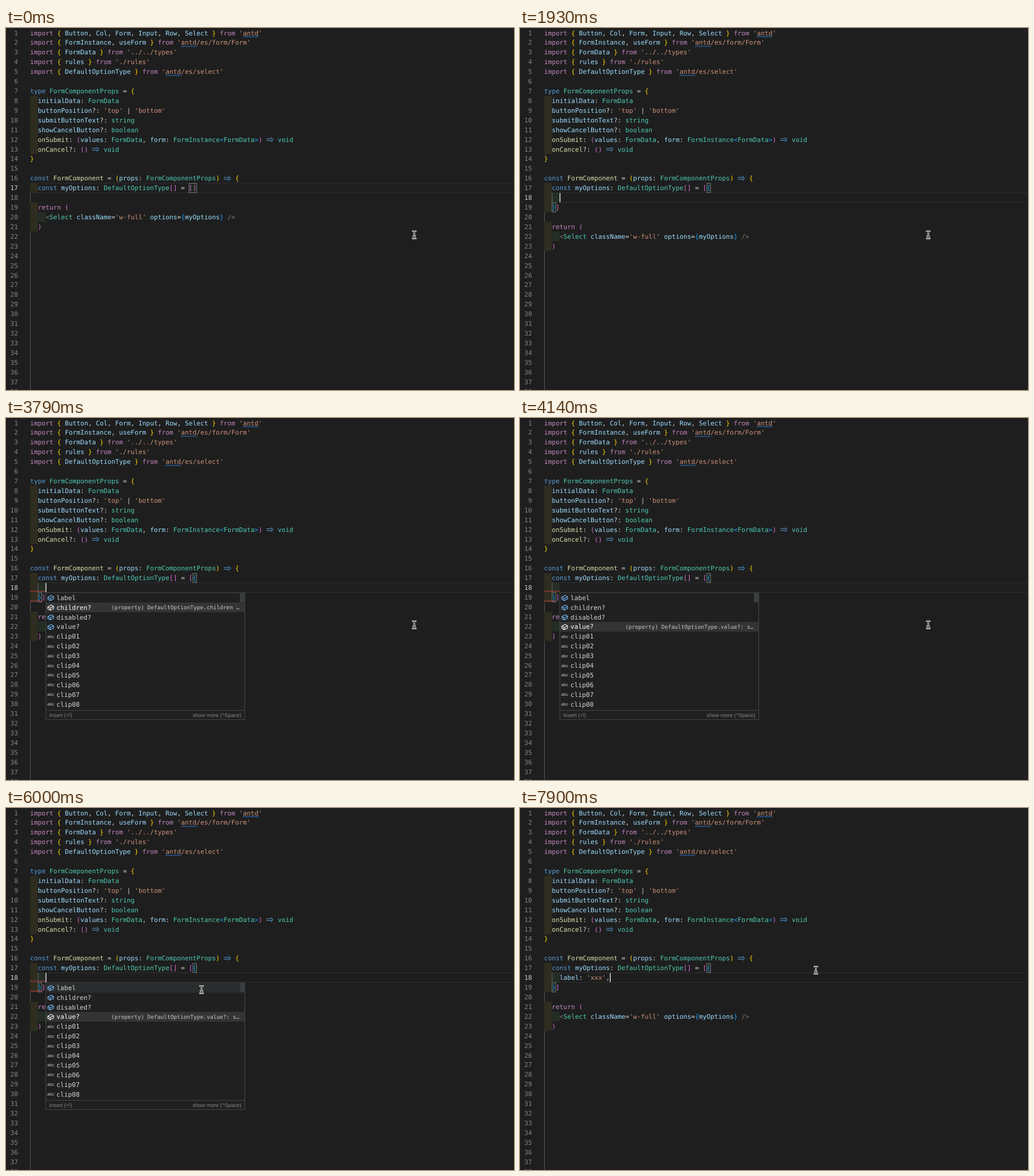
Write an HTML page that moves like this. It is 886 px wide and 632 px high and loops after 8 s.

```html
<!DOCTYPE html>
<html lang="en">
<head>
<meta charset="utf-8">
<title>Code editor</title>
<style>
  html, body { margin: 0; width: 100%; height: 100%; overflow: hidden; background: #1e1e1e; }
  svg { display: block; }
  text { white-space: pre; text-rendering: geometricPrecision; }
  .code { font: 11.212px "DejaVu Sans Mono", "Liberation Mono", monospace; }
  .detail { font: 9.54px "DejaVu Sans Mono", "Liberation Mono", monospace; fill: #c8c8c8; }
  .abc { font: 7.4px "Liberation Sans", sans-serif; fill: #cccccc; }
  .foot { font: 9.3px "Liberation Sans", "DejaVu Sans", sans-serif; fill: #858585; }
  .line { fill: none; stroke-linecap: round; stroke-linejoin: round; }
</style>
</head>
<body>
<svg width="886" height="632" viewBox="0 0 886 632">
  <defs>
    <path id="cube" class="line" stroke-width="1.1" d="M-5-1.2 1-4.3 5-1.8V2L-1 4.8-5 2.3ZM-5-1.2-1 1.2 5-1.8M-1 1.2V4.8"/>
    <path id="stem" class="line" d="M-2.7-6.2Q0-6.2 0-4.2Q0-6.2 2.7-6.2M0-4.5V4.8M-2.7 6.4Q0 6.4 0 4.4Q0 6.4 2.7 6.4M-1.6 2.4H1.6"/>
    <g id="beam">
      <use href="#stem" stroke="#fff" stroke-width="2.6"/>
      <use href="#stem" stroke="#111" stroke-width=".9"/>
    </g>
    <path id="hand" d="M-3.6-5Q-2.7-6.3-1.6-5L-.2-1.6Q1-2.5 1.8-1.4Q3-2 3.6-.8Q5-1 5.1.6L4.6 3.4 3.6 6H-1.4L-4.7 1.7Q-5 .2-3.5.4L-2.2 1.4Z" fill="#fff" stroke="#111" stroke-width=".9" stroke-linejoin="round"/>
  </defs>
  <g id="view"></g>
</svg>
<script>
const LOOP = 8000, X = 42, CW = 6.75, LH = 16.92;
const COLORS = {
  p: '#c586c0', y: '#ffd700', v: '#9cdcfe', w: '#d4d4d4', s: '#ce9178', k: '#569cd6',
  t: '#4ec9b0', f: '#dcdcaa', m: '#da70d6', u: '#179fff', g: '#808080'
};
const rowY = n => (n - 1) * LH;
const at = col => X + col * CW;
const esc = s => s.replace(/&/g, '&amp;').replace(/</g, '&lt;').replace(/>/g, '&gt;');
const rect = (x, y, w, h, fill, more = '') =>
  `<rect x="${x}" y="${y}" width="${w}" height="${h}" fill="${fill}" ${more}/>`;
const text = (x, y, s, cls, more = '') => `<text x="${x}" y="${y}" class="${cls}" ${more}>${esc(s)}</text>`;

function arrow(x, y) {
  return `<path class="line" stroke="${COLORS.k}" stroke-width="1" d="M${x + .8} ${y - 1.6}h9.6M${x + .8} ${y + 1.6}h9.6M${x + 8.6} ${y - 3.8}l3.8 3.8-3.8 3.8"/>`;
}

// "~k" starts a run in colour k
function codeLine(n, src) {
  let col = 0;
  return src.split('~').slice(1).map(run => {
    const s = run.slice(1), x = at(col);
    col += s.length;
    return s[0] === '⇒' ? arrow(x, rowY(n) + 8.7)
      : text(x, rowY(n) + 12.5, s, 'code', `fill="${COLORS[run[0]]}"`);
  }).join('');
}

function wave(n, from, to, color) {
  const y = rowY(n) + 15;
  let d = `M${from} ${y + 1}`, up = true;
  for (let x = from; x < to - 1; x += 2.25, up = !up) d += `l2.25 ${up ? -2 : 2}`;
  return `<path class="line" stroke="${color}" stroke-width=".9" d="${d}"/>`;
}

const box = (n, col, cells = 1) =>
  rect(at(col) + .5, rowY(n) + .6, cells * CW - .4, LH - .9, 'rgba(0,100,0,.1)', 'stroke="#888" stroke-width=".9"');

const indent = (n, levels) =>
  rect(X, rowY(n), 2 * CW, LH + .1, '#2e2d20') +
  (levels > 1 ? rect(at(2), rowY(n), 2 * CW, LH + .1, '#252e25') : '');

const imports = (names, path) =>
  `~pimport ~y{ ` + names.split(' ').map(s => '~v' + s).join('~w, ') + ` ~y} ~pfrom ~s'${path}'`;

const HEAD = [
  imports('Button Col Form Input Row Select', 'antd'),
  imports('FormInstance useForm', 'antd/es/form/Form'),
  imports('FormData', '../../types'),
  imports('rules', './rules'),
  imports('DefaultOptionType', 'antd/es/select'),
  '',
  '~ktype ~tFormComponentProps~w = ~y{',
  '~v  initialData~w: ~tFormData',
  "~v  buttonPosition~w?: ~s'top'~w | ~s'bottom'",
  '~v  submitButtonText~w?: ~tstring',
  '~v  showCancelButton~w?: ~tboolean',
  '~f  onSubmit~w: ~m(~vvalues~w: ~tFormData~w, ~vform~w: ~tFormInstance~u<~tFormData~u>~m)~w ~k⇒ ~t void',
  '~f  onCancel~w?: ~m()~w ~k⇒ ~t void',
  '~y}',
  '',
  '~kconst ~fFormComponent~w = ~y(~vprops~w: ~tFormComponentProps~y)~w ~k⇒ ~y {'
];
const DECL = '~k  const ~vmyOptions~w: ~tDefaultOptionType~m[]~w = ~m[';
const TAIL = [
  '~p  return ~m(',
  "~g    <~tSelect ~vclassName~w=~s'w-full'~v options~w=~u{~vmyOptions~u} ~g/>",
  '~m  )'
];

const SPELL = '#3794ff', ERROR = '#f14c4c';
const head = [8, 9, 10, 11, 12, 13].map(n => indent(n, 1)).join('') +
  HEAD.map((s, i) => codeLine(i + 1, s)).join('') +
  [[1, 55], [2, 39], [5, 35]].map(([n, c]) => wave(n, at(c), at(c + 4), SPELL)).join('');

const ITEMS = ['label', 'children?', 'disabled?', 'value?',
  ...Array.from({ length: 8 }, (_, i) => 'clip0' + (i + 1))];
const DETAILS = ['label: Re…', 'children …', 'disabled?…', 'value?: s…'];

function popup(t) {
  const sel = [3790, 3960, 4140].filter(k => t >= k).length;
  const short = t >= 4920 && t < 5650;
  let out = rect(69.5, 305, 347, 221.5, '#202020', 'stroke="#454545" stroke-width="1"');
  ITEMS.forEach((s, i) => {
    const y = 305.3 + i * LH, on = i === sel;
    if (on) out += rect(70, y, 346, LH, '#343436');
    else if (i === 0 && t >= 5830) out += rect(70, y, 346, LH, '#2a2d2e');
    out += i < 4
      ? `<use href="#cube" x="78" y="${y + 8.6}" stroke="${on ? '#fff' : '#75beff'}"/>`
      : text(72, y + 10.8, 'abc', 'abc');
    out += text(88, y + 12.4, s, 'code', `fill="${on ? '#fff' : '#d4d4d4'}"`);
    if (on) {
      const tail = short ? 'value?:…' : DETAILS[i];
      out += text(183.5, y + 11.7, '(property) DefaultOptionType.' + tail, 'detail');
    }
  });
  return out + rect(408, 305.5, 8.5, 16, '#3b3e40') + rect(70, 510, 346.5, 1, '#454545') +
    text(75.5, 522, 'Insert (⏎)', 'foot') +
    text(410.5, 522, 'show more (^Space)', 'foot', 'text-anchor="end"');
}

const PATH = [[0, 712, 361], [4230, 712, 361], [4500, 520, 371], [4660, 362, 371], [4850, 362, 371],
  [4920, 356, 349], [5740, 343, 320], [5970, 341, 317], [6080, 341, 317], [6240, 516, 283], [LOOP, 516, 283]];

function mouse(t) {
  const q = Math.floor(t / 87.9) * 87.9;
  const i = PATH.findIndex(k => k[0] > q);
  const [a, b] = [PATH[i - 1], PATH[i]], f = (q - a[0]) / (b[0] - a[0]);
  const x = a[1] + (b[1] - a[1]) * f, y = a[2] + (b[2] - a[2]) * f;
  const hand = x < 417 && t < 5800;
  return `<use href="#${hand ? 'hand' : 'beam'}" x="${x.toFixed(1)}" y="${y.toFixed(1)}"/>`;
}

function typed(t) {
  if (t < 6090) return { src: '', col: 4 };
  if (t < 6620) return { src: '~v    label', col: 9 };
  if (t < 6710) return { src: '~v    label~w:', col: 10 };
  if (t < 7030) return { src: '~v    label~w: ', col: 11 };
  const n = [7200, 7380, 7470].filter(k => t >= k).length;
  return {
    src: `~v    label~w: ~s'${'x'.repeat(n)}'` + (t >= 7850 ? '~w,' : ''),
    col: t >= 7850 ? 17 : t >= 7670 ? 16 : 12 + n
  };
}

const HIDDEN = [[0, 360], [1250, 1660], [2190, 2640], [3160, 3610], [4140, 4580], [5110, 5560]];

function errors(t) {
  let out = '';
  if (t >= 2110 && t < 6620) out += wave(18, X, at(4), ERROR);
  if (t >= 6620 && t < 7850) out += wave(18, at(4), at(9), ERROR);
  if (t >= 2110 && t < 7030) out += wave(19, X, at(t < 6620 ? 3 : 2), ERROR);
  return out;
}

function frame(t) {
  const open = t >= 1660, brace = t >= 740;
  const active = open ? 18 : 17, first = open ? 21 : 19;
  const entry = typed(t);
  const caretCol = open ? entry.col : brace ? 43 : 42;

  let out = rect(X, rowY(17), 1, 632 - rowY(17), '#5a5a5a');
  for (const edge of [rowY(active), rowY(active + 1)]) out += rect(X, edge - .4, 844, 1, '#303030');
  out += indent(17, 1) + indent(first, 1) + indent(first + 1, 2) + indent(first + 2, 1);
  if (open) out += indent(18, 2) + indent(19, 1) + rect(at(2), rowY(18), 1, LH, '#686868');
  out += head;

  for (let n = 1; n <= 38; n++) {
    out += text(21, rowY(n) + 12.5, String(n), 'code',
      `text-anchor="end" fill="${n === active ? '#d0d0d0' : '#858585'}"`);
  }

  if (!open) {
    if (!brace) out += box(17, 41, 2);
    else if (t >= 830) out += box(17, 42, 2);
    out += codeLine(17, DECL + (brace ? '~u{}' : '') + '~m]');
  } else {
    out += box(17, 42) + (t >= 1930 ? box(19, 2) : '');
    out += codeLine(17, DECL + '~u{') + codeLine(18, entry.src) + codeLine(19, '~u  }~m]');
  }
  TAIL.forEach((s, i) => out += codeLine(first + i, s));
  out += errors(t);

  if (!HIDDEN.some(([a, b]) => t >= a && t < b)) {
    out += rect(at(caretCol), rowY(active) + .4, 1.4, LH - .8, '#e4e4e4');
  }
  if (t >= 2810 && t < 6090) out += popup(t);
  return out + mouse(t);
}

const view = document.getElementById('view');
const start = performance.now();
let last = '';
function tick() {
  const html = frame((performance.now() - start) % LOOP);
  if (html !== last) view.innerHTML = last = html;
  requestAnimationFrame(tick);
}
tick();
</script>
</body>
</html>
```
